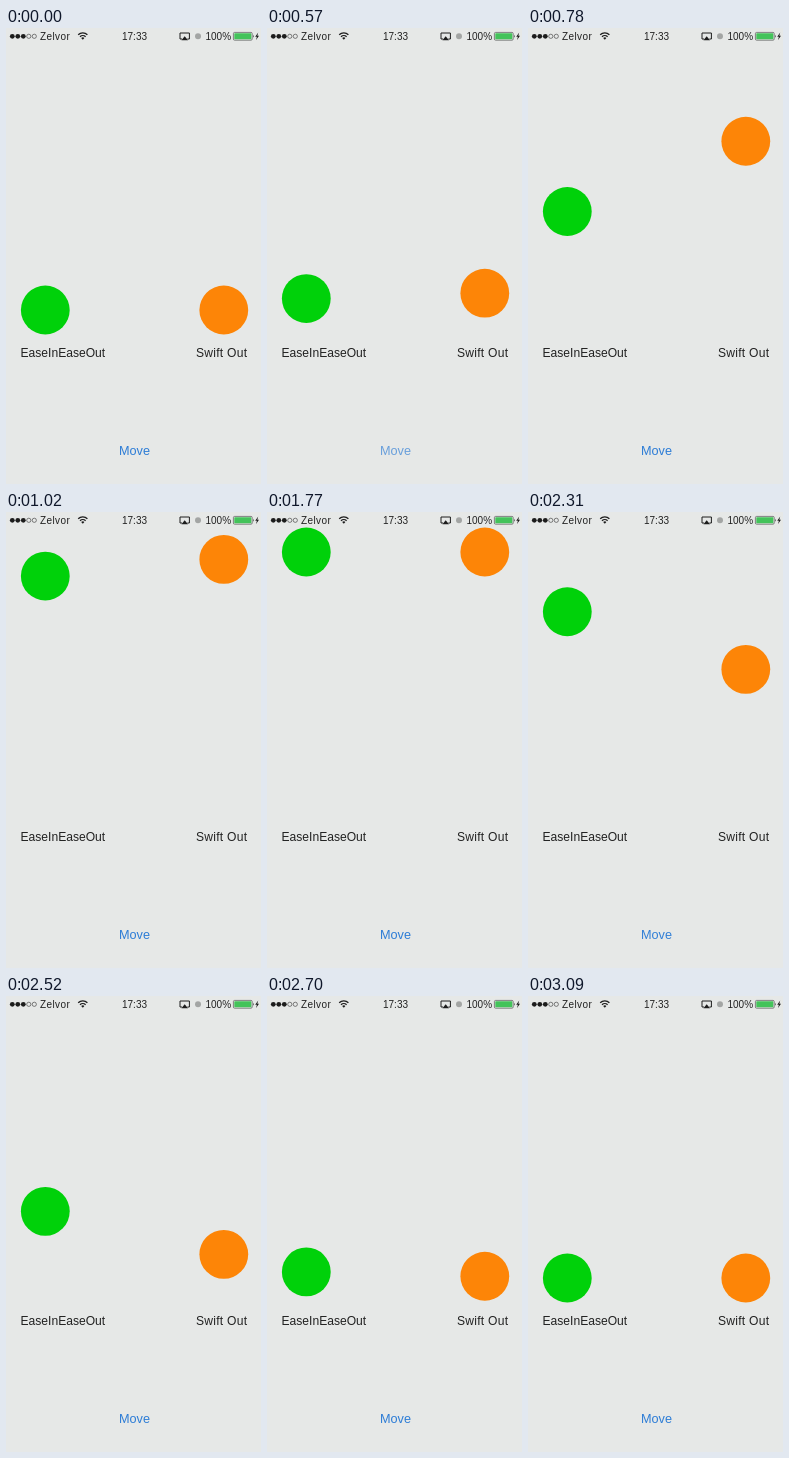
An HTML page for the animation above (3120 ms loop, 255 by 456 pixels).

```html
<!DOCTYPE html>
<html lang="en">
<head>
<meta charset="utf-8">
<title>Easing comparison</title>
<style>
  html, body { margin: 0; width: 100%; height: 100%; overflow: hidden; background: #e6e8e7; }
  svg { display: block; width: 255px; height: 456px; }
  text { font: 12.1px "Liberation Sans", Arial, sans-serif; fill: #222; }
  .status text { font-size: 10px; }
</style>
</head>
<body>
<svg viewBox="0 0 255 456">
  <g class="status" fill="#1c1c1c">
    <circle cx="6.3" cy="8.3" r="2.4"/>
    <circle cx="11.8" cy="8.3" r="2.4"/>
    <circle cx="17.3" cy="8.3" r="2.4"/>
    <g fill="none" stroke="#333" stroke-width=".6">
      <circle cx="22.8" cy="8.3" r="2.1"/>
      <circle cx="28.3" cy="8.3" r="2.1"/>
    </g>
    <text x="34" y="12" letter-spacing=".4">Zelvor</text>
    <g fill="none" stroke="#1c1c1c" stroke-width="1.3">
      <path d="M72.2 6.8a6.6 6.6 0 0 1 9.2 0M74 8.8a4 4 0 0 1 5.6 0"/>
    </g>
    <path d="M76.8 11.8l-1.6-1.8a2.3 2.3 0 0 1 3.2 0z"/>
    <text x="116" y="12">17:33</text>
    <path d="M176 11h-2V5h9.4v6h-2" fill="none" stroke="#1c1c1c"/>
    <path d="M175.4 12.2l3.3-4 3.3 4z"/>
    <circle cx="192" cy="8.2" r="3" fill="#a3a5a4"/>
    <text x="199.5" y="12">100%</text>
    <rect x="227.4" y="4.4" width="18.8" height="7.8" rx="1.2" fill="none" stroke="#555" stroke-width=".7"/>
    <rect x="228.3" y="5.3" width="17" height="6" rx=".5" fill="#43c35a"/>
    <path d="M247 6.8q1.4 1.5 0 3z"/>
    <path d="M252.2 4.6l-3 4.2h1.7l-.9 3.2 3-4.3h-1.7z"/>
  </g>
  <circle id="left" cx="39.3" r="24.4" fill="#00d10a"/>
  <circle id="right" cx="217.8" r="24.4" fill="#fd8507"/>
  <text x="14.5" y="329">EaseInEaseOut</text>
  <text x="190" y="329" letter-spacing=".25">Swift Out</text>
  <text id="move" x="128.5" y="427" text-anchor="middle" style="font-size:12.7px;fill:#2c7cd6">Move</text>
</svg>
<script>
const LOOP = 3120, DURATION = 718, FADE = 300;
const UP = 461, DOWN = 2064, PRESS = 11;
const BOTTOM = 282, TOP = 40;
const [leftBall, rightBall, button] = ["left", "right", "move"].map(id => document.getElementById(id));
const clamp = v => Math.min(1, Math.max(0, v));

// Timing curve cubic-bezier(x1, 0, x2, 1)
const bezier = (x1, x2) => x => {
  let low = 0, high = 1, s = .5;
  for (let i = 0; i < 24; i++) {
    s = (low + high) / 2;
    const r = 1 - s;
    if (3 * r * r * s * x1 + 3 * r * s * s * x2 + s ** 3 < x) low = s;
    else high = s;
  }
  return s * s * (3 - 2 * s);
};
const easeInOut = bezier(.42, .58), swiftOut = bezier(.4, .2);

function centerY(ease, t) {
  const progress = start => ease(clamp((t - start) / DURATION));
  return BOTTOM + (TOP - BOTTOM) * (progress(UP) - progress(DOWN));
}

// The button dims when pressed and fades back after release
function buttonOpacity(t) {
  const start = t < DOWN - PRESS ? UP : DOWN;
  if (t < start - PRESS) return 1;
  return 1 - .8 * (1 - clamp((t - start) / FADE)) ** 2;
}

function draw() {
  const t = performance.now() % LOOP;
  leftBall.setAttribute("cy", centerY(easeInOut, t));
  rightBall.setAttribute("cy", centerY(swiftOut, t));
  button.setAttribute("opacity", buttonOpacity(t));
  requestAnimationFrame(draw);
}
draw();
</script>
</body>
</html>
```
